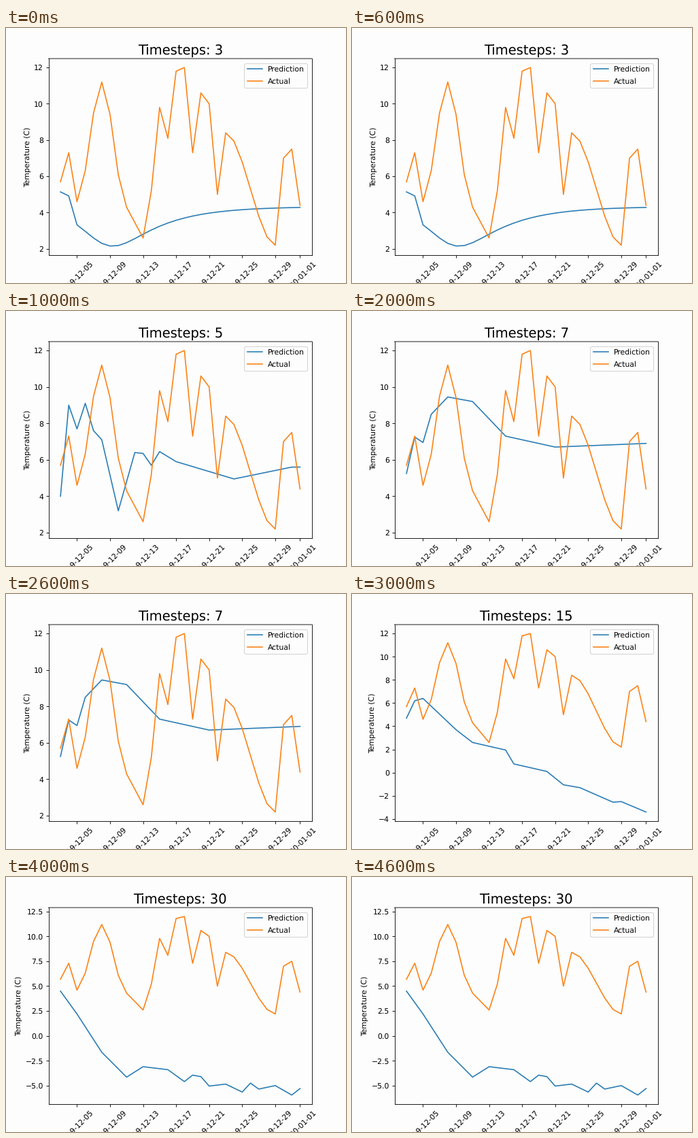
These frames come from a looping animation (500 px wide and 375 px high, 5000 ms). A matplotlib script:

```python
import numpy as np
import matplotlib.pyplot as plt
from matplotlib.animation import FuncAnimation

plt.rcParams.update({"font.family": "DejaVu Sans", "text.hinting": "none"})
PAPER, BLUE, ORANGE = "#fdfdfd", "#2a7cb5", "#fb8216"

dates = np.arange("2019-12-03", "2020-01-02", dtype="datetime64[D]")
day = np.arange(len(dates))


def linear(t):
    return t


def smooth(t):
    return t * t * (3 - 2 * t)


def trend(keys, ease=linear):
    """Daily values passing through {day: value} key points."""
    order = np.arange(len(keys))
    pos = np.interp(day, list(keys), order)
    start = np.floor(pos)
    return np.interp(start + ease(pos - start), order, list(keys.values()))


def settling():
    """A short plateau, a dip, then exponential recovery to a limit."""
    dip = 10.3 * 0.83 ** day / (1 + np.exp(-0.6 * (day - 5)))
    return 4.33 - dip + 1.3 * (day < 2)


actual = trend({0: 5.7, 1: 7.3, 2: 4.6, 5: 11.2, 8: 4.3, 10: 2.6, 11: 5.2,
                12: 9.8, 13: 8.1, 14: 11.8, 15: 12, 16: 7.3, 17: 10.6, 18: 10,
                19: 5, 20: 8.4, 26: 2.2, 27: 7, 28: 7.5, 29: 4.4}, smooth)

predictions = {
    3: settling(),
    5: trend({0: 4, 1: 9, 2: 7.7, 3: 9.1, 4: 7.6, 5: 7.1, 7: 3.2, 9: 6.4,
              10: 6.35, 11: 5.7, 12: 6.45, 14: 5.9, 21: 4.95, 28: 5.6}),
    7: trend({0: 5.25, 1: 7.25, 2: 6.95, 3: 8.5, 5: 9.45, 8: 9.2, 12: 7.3,
              18: 6.7, 29: 6.9}),
    15: trend({0: 4.7, 1: 6.2, 2: 6.4, 6: 3.7, 8: 2.6, 12: 1.95, 13: 0.75,
               17: 0.1, 19: -1.05, 21: -1.3, 25: -2.55, 26: -2.5, 29: -3.4}),
    30: trend({0: 4.5, 2: 2.2, 5: -1.65, 8: -4.15, 10: -3.1, 13: -3.4,
               15: -4.6, 16: -3.95, 17: -4.1, 18: -5.05, 20: -4.85, 22: -5.65,
               23: -4.75, 24: -5.35, 26: -5, 28: -5.95, 29: -5.3}),
}
steps = list(predictions)

fig, ax = plt.subplots(figsize=(6.4, 4.8), dpi=78.125, facecolor=PAPER)
ax.set_facecolor(PAPER)
ax.spines["top"].set_snap(False)
pred_line, = ax.plot(dates, predictions[steps[0]], color=BLUE, label="Prediction")
ax.plot(dates, actual, color=ORANGE, label="Actual")
ax.set_ylabel("Temperature (C)")
ax.tick_params(axis="x", rotation=45)
ax.legend(loc="upper right", facecolor=PAPER, borderaxespad=0.6, labelspacing=0.62)
title = ax.set_title("", fontsize=18, pad=5.5)


def update(i):
    n = steps[i]
    pred_line.set_ydata(predictions[n])
    title.set_text(f"Timesteps: {n}")
    ax.relim()
    ax.autoscale_view()
    return pred_line, title


anim = FuncAnimation(fig, update, frames=len(steps), interval=1000,
                     repeat=True, repeat_delay=0, blit=False)
plt.show()
```
